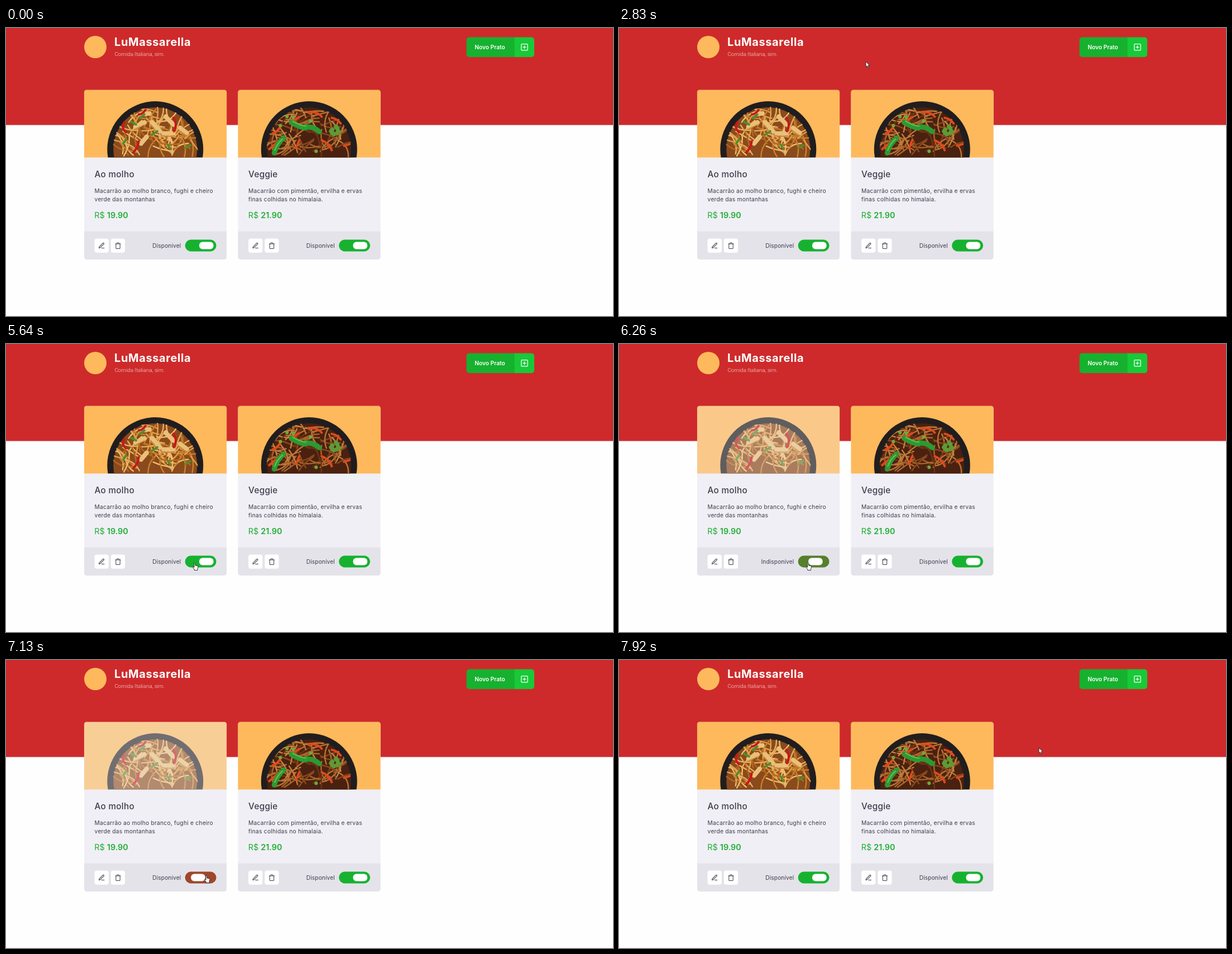
Animation of 1087x515 px, one loop 8000 ms. Source, as an HTML page:

```html
<!DOCTYPE html>
<html lang="pt">
<head>
<meta charset="utf-8">
<title>Cardápio</title>
<style>
  html, body { margin: 0; width: 100%; height: 100%; overflow: hidden; background: #fefefe; }
  svg { display: block; width: 100vw; height: 100vh; }
  text { font-family: Inter, "Open Sans", sans-serif; fill: #3d3d4d; }
  .brand { font-size: 20px; font-weight: 700; letter-spacing: .6px; fill: #fff; }
  .tag { font: 300 9.8px Roboto, sans-serif; fill: #fbdcd6; }
  .add { font-size: 10.2px; font-weight: 600; fill: #fff; }
  .title { font-size: 15.3px; font-weight: 500; letter-spacing: .28px; }
  .desc { font-size: 10.3px; letter-spacing: .2px; }
  .price { font-size: 14.4px; fill: #1fae35; }
  .price .sum { font-weight: 600; }
  .label { font-size: 10.2px; letter-spacing: .1px; text-anchor: end; }
  .icon { fill: none; stroke: #3d3d4d; stroke-width: 2; stroke-linecap: round; stroke-linejoin: round; }
  .food { fill: none; stroke-linecap: round; }
</style>
</head>
<body>
<svg id="stage" viewBox="0 0 1087 515"></svg>
<script>
const LOOP = 8000;
const GREEN = [22, 178, 47], RED = [199, 40, 40];
const KNOB_ON = 206.2, KNOB_OFF = 187.2;

const PEN = '<path d="M12 20h9M16.5 3.5a2.12 2.12 0 0 1 3 3L7 19l-4 1 1-4z"/>';
const BIN = '<path d="M3 6h18M19 6v14a2 2 0 0 1-2 2H7a2 2 0 0 1-2-2V6m3 0V4a2 2 0 0 1 2-2h4a2 2 0 0 1 2 2v2"/>';

const dishes = [
  {
    x: 139.8, name: 'Ao molho', sum: '19.90', seed: 7,
    lines: ['Macarrão ao molho branco, fughi e cheiro', 'verde das montanhas'],
    base: '#8a4a1c', noodles: ['#e0a04a', '#c9822f', '#edbd70', '#b5691f', '#e7ae5c'],
    bits: [
      ['#eabf78', 8, 'M92 66l16-8M122 58l14 16M146 48l14 14M142 78l18 0M103 44l14-2M172 68l12 9M112 84l-10 12'],
      ['#c98a3c', 2, 'M90 71l17-8M120 63l12 15M142 83h19M170 73l12 8'],
      ['#c9161d', 4, 'M72 58q-6 10 3 18M98 92q-2 12-10 20M160 50q8 12 1 24M110 36q-6 8-12 8'],
      ['#4d8f2c', 4, 'M100 50l8-6M84 57l9 5M122 80l9-6M182 104l8-5M150 98l4 7M70 96l5-7']
    ]
  },
  {
    x: 415.3, name: 'Veggie', sum: '21.90', seed: 23,
    lines: ['Macarrão com pimentão, ervilha e ervas', 'finas colhidas no himalaia.'],
    base: '#4a2110', noodles: ['#a9652c', '#8a4a1d', '#c4833f', '#6e3414', '#b87436'],
    bits: [
      ['#e0491c', 4, 'M62 78q8-2 14-12M126 40q16-2 24 8M168 50q10 2 16 10M56 106l12-10M150 90q14 6 18 18M96 62q6-10 14-13M190 100l10-3M104 104l6-14'],
      ['#2b9a32', 9, 'M96 58q16 10 26 10M122 66q14 0 24 9M82 86q-12 10-17 27'],
      ['#63c04f', 2, 'M98 56q14 8 24 9M80 88q-10 8-14 20'],
      ['#5e9a35', 8, 'M167 74l2-3M176 66l2 3M181 75l-3 2M170 78l2 1'],
      ['#6aad3a', 6, 'M99 49h.1M76 64h.1M88 48h.1M140 110h.1M130 56h.1']
    ]
  }
];

function random(seed) {
  return () => (seed = (seed * 16807) % 2147483647) / 2147483647;
}

function strands(dish) {
  const rnd = random(dish.seed * 9973);
  let out = '';
  for (let i = 0; i < 75; i++) {
    const a = rnd() * 6.28, r = 74 * Math.sqrt(rnd()), turn = rnd() * 6.28;
    const x = 127.5 + r * Math.cos(a), y = 106.5 - Math.abs(r * Math.sin(a));
    const dx = 18 * Math.cos(turn), dy = 18 * Math.sin(turn), bend = rnd() * 1.4 - .7;
    const color = dish.noodles[i % dish.noodles.length];
    out += `<path stroke="${color}" stroke-width="2.4" d="M${x - dx} ${y - dy}` +
      `Q${x - dy * bend} ${y + dx * bend} ${x + dx} ${y + dy}"/>`;
  }
  return out;
}

function bits(dish) {
  return dish.bits.map(([c, w, d]) => `<path stroke="${c}" stroke-width="${w}" d="${d}"/>`).join('');
}

function iconButton(x, icon) {
  return `<rect x="${x}" y="266" width="25.2" height="25.2" rx="4" fill="#fff"/>
    <g class="icon" transform="translate(${x + 6.3} 272.3) scale(.525)">${icon}</g>`;
}

function card(dish, i) {
  return `<g transform="translate(${dish.x} 110.6)" clip-path="url(#card)">
    <rect width="255.5" height="303.4" fill="#f0eff5"/>
    <g id="photo${i}">
      <rect width="255.5" height="121" fill="#feb95c"/>
      <g clip-path="url(#photo)">
        <circle cx="127.5" cy="106.5" r="86" fill="#211d1e"/>
        <g class="food" clip-path="url(#bowl)">
          <circle cx="127.5" cy="106.5" r="75" fill="${dish.base}"/>
          ${strands(dish)}${bits(dish)}
        </g>
      </g>
    </g>
    <text class="title" x="18.8" y="156.4">${dish.name}</text>
    <text class="desc" x="18.8" y="184">${dish.lines[0]}</text>
    <text class="desc" x="18.8" y="199">${dish.lines[1]}</text>
    <text class="price" x="18.4" y="229.3">R$</text>
    <text class="price" x="41" y="229.3"><tspan class="sum">${dish.sum}</tspan></text>
    <rect y="253" width="255.5" height="50.4" fill="#e4e3ea"/>
    ${iconButton(18.8, PEN)}${iconButton(48.1, BIN)}
    <text class="label" id="label${i}" x="173.5" y="282">Disponível</text>
    <rect id="track${i}" x="180.8" y="268" width="56" height="20.8" rx="10.4" fill="rgb(${GREEN})"/>
    <rect id="knob${i}" x="${KNOB_ON}" y="272" width="25.6" height="12.8" rx="6" fill="#fff"/>
  </g>`;
}

document.getElementById('stage').innerHTML = `
  <defs>
    <clipPath id="card"><rect width="255.5" height="303.4" rx="5"/></clipPath>
    <clipPath id="photo"><rect width="255.5" height="121"/></clipPath>
    <clipPath id="bowl"><circle cx="127.5" cy="106.5" r="76"/></clipPath>
    <clipPath id="button"><rect x="824.6" y="16.5" width="121.4" height="35.5" rx="5"/></clipPath>
  </defs>
  <rect width="1087" height="515" fill="#fefefe"/>
  <rect width="1087" height="173.5" fill="#ce2a2b"/>
  <circle cx="160" cy="34" r="20" fill="#feb95c"/>
  <text class="brand" x="194" y="32.3">LuMassarella</text>
  <text class="tag" x="194.5" y="50.3">Comida Italiana, sim.</text>
  <g clip-path="url(#button)">
    <rect x="824" y="16" width="87" height="37" fill="#16b12f"/>
    <rect x="910.5" y="16" width="36" height="37" fill="#18c938"/>
  </g>
  <text class="add" x="839.3" y="38">Novo Prato</text>
  <g class="icon" style="stroke:#fff" transform="translate(920.9 26.7) scale(.63)">
    <rect x="3" y="3" width="18" height="18" rx="2"/><path d="M12 8v8M8 12h8"/>
  </g>
  ${dishes.map(card).join('')}
  <g id="cursor" stroke="#222" stroke-width=".9" stroke-linejoin="round" fill="#fff">
    <path id="arrow" d="M0 0V9.6L2.2 7.6L3.8 11L5.4 10.3L3.9 7H6.7Z"/>
    <path id="hand" d="M-1 1Q0-.6 1 1V5L5 5.8Q6 6 6 7.5L5 11.5V13.6H-.5V12L-3.6 8.5Q-4-7.2-3 7L-1 8.5Z"/>
  </g>`;

const el = id => document.getElementById(id);
el('hand').setAttribute('d', 'M-1 1Q0-.6 1 1V5L5 5.8Q6 6 6 7.5L5 11.5V13.6H-.5V12L-3.6 8.5Q-4 7.2-3 7L-1 8.5Z');

// Spans of movement: start, end, number of steps
const spans = [[500, 730, 4], [2830, 3630, 11], [3710, 4500, 11], [4580, 5310, 10],
  [5470, 5640, 3], [6180, 6970, 11], [7050, 7530, 7], [7690, 7920, 4]];

// Cursor tip: time, x, y
const trail = [
  [500, 1080, 36], [580, 930, 24], [650, 716, 2], [2830, 442, 60], [2990, 300, 21],
  [3150, 140, 60], [3310, 75, 160], [3470, 180, 291], [3630, 290, 215], [3790, 285, 70],
  [3950, 235, 18], [4110, 188, 90], [4270, 225, 190], [4500, 317, 239], [4580, 333, 300],
  [4740, 350, 355], [4900, 357, 388], [5310, 347, 391], [5640, 338, 391], [6260, 338.5, 391],
  [6420, 334, 388.5], [6970, 348, 386], [7130, 359, 385], [7530, 357, 385],
  [7690, 400, 340], [7770, 540, 255], [7920, 752, 157]
];

function stepped(t) {
  let held = 0;
  for (const [from, to, n] of spans) {
    if (t < from) break;
    const step = (to - from) / (n - 1);
    held = Math.min(to, from + Math.floor((t - from) / step + .01) * step);
  }
  return held;
}

function tip(t) {
  const i = trail.findIndex(k => k[0] > t);
  if (i < 1) return trail[i < 0 ? trail.length - 1 : 0].slice(1);
  const [t0, x0, y0] = trail[i - 1], [t1, x1, y1] = trail[i];
  const p = (t - t0) / (t1 - t0);
  return [x0 + (x1 - x0) * p, y0 + (y1 - y0) * p];
}

// Same curve as the CSS "ease" keyword
function ease(x) {
  if (x <= 0 || x >= 1) return x <= 0 ? 0 : 1;
  let lo = 0, hi = 1, s = x;
  for (let i = 0; i < 24; i++) {
    s = (lo + hi) / 2;
    const bx = .75 * s * (1 - s) + s ** 3;
    if (bx < x) lo = s; else hi = s;
  }
  return .3 * s * (1 - s) ** 2 + 3 * s * s * (1 - s) + s ** 3;
}

const offAmount = (t, off, on) => ease((t - off) / 300) - ease((t - on) / 300);

function draw(time) {
  const t = stepped(time);
  const fade = offAmount(t, 6180, 7050), slide = offAmount(t, 6190, 7080);
  el('photo0').setAttribute('opacity', 1 - .7 * fade);
  el('track0').setAttribute('fill', `rgb(${GREEN.map((g, i) => Math.round(g + (RED[i] - g) * slide))})`);
  el('knob0').setAttribute('x', KNOB_ON + (KNOB_OFF - KNOB_ON) * slide);
  el('label0').textContent = t >= 6180 && t < 7050 ? 'Indisponível' : 'Disponível';

  const [x, y] = tip(t);
  const shown = (t >= 500 && t < 729) || t >= 2830;
  const over = x > 321 && x < 376 && y > 378 && y < 400;
  el('cursor').setAttribute('transform', `translate(${x} ${y})`);
  el('cursor').setAttribute('visibility', shown ? 'visible' : 'hidden');
  el('arrow').setAttribute('display', over ? 'none' : 'inline');
  el('hand').setAttribute('display', over ? 'inline' : 'none');
}

const start = performance.now();
function tick() {
  draw((performance.now() - start) % LOOP);
  requestAnimationFrame(tick);
}
tick();
</script>
</body>
</html>
```
